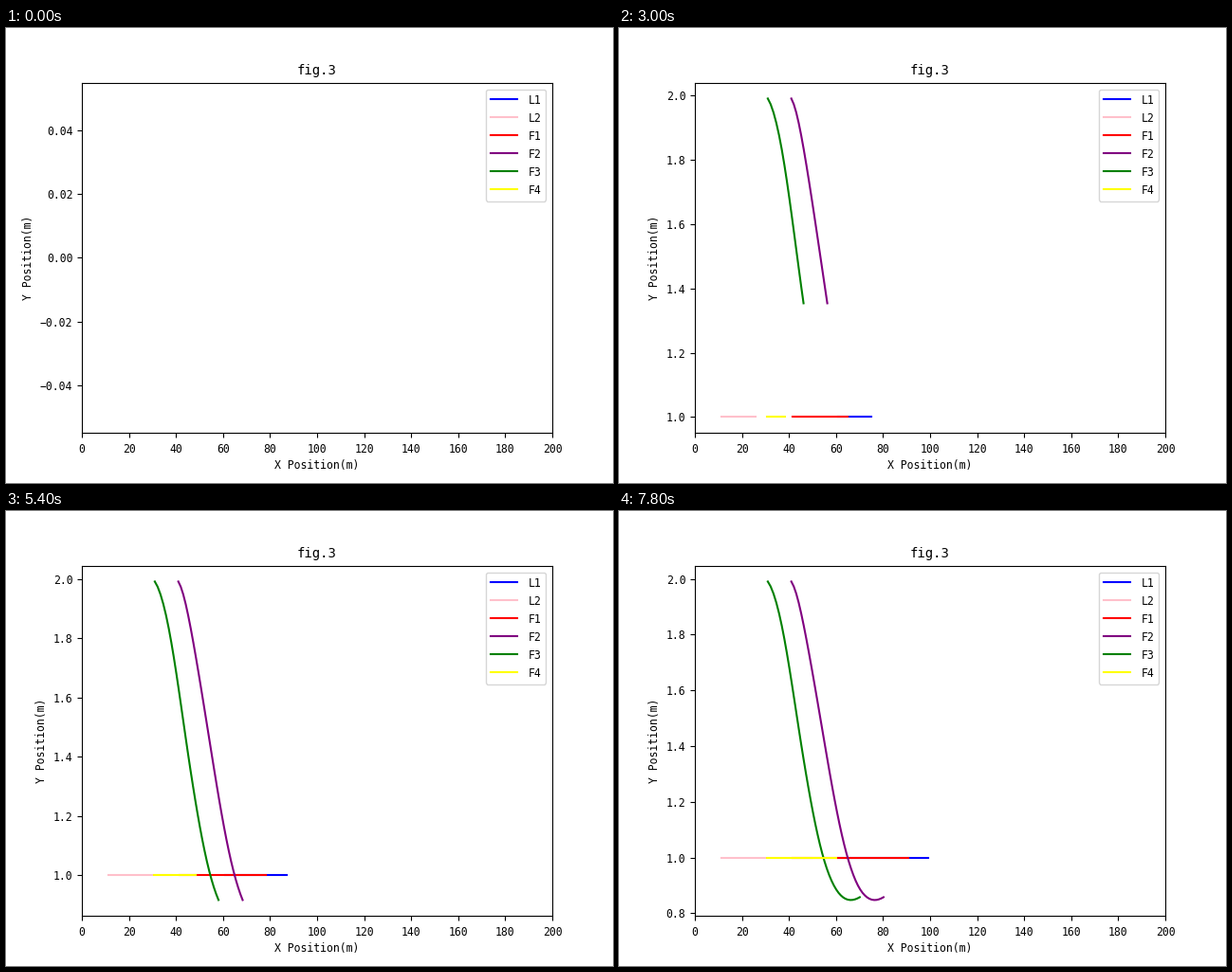
Animation, 640 px wide and 480 px high, one loop 8000 ms. Source, as a matplotlib script:

```python
import matplotlib.pyplot as plt
import numpy as np
from matplotlib.animation import FuncAnimation

FRAMES, INTERVAL = 40, 200
TEXT, TITLE = 8.3, 10
K = 10 / TEXT  # keeps legend spacing independent of the text size

plt.rcParams["font.family"] = "DejaVu Sans Mono"
plt.rcParams["font.size"] = TEXT

step = np.arange(1, FRAMES)
KEYS = np.array([1, 5, 15, 25, 29, 33, 39])


def smooth(values):
    """Cubic Hermite curve through the key steps."""
    v = np.array(values, float)
    slope = np.gradient(v, KEYS)
    j = np.clip(np.searchsorted(KEYS, step, side="right") - 1, 0, len(KEYS) - 2)
    h = KEYS[j + 1] - KEYS[j]
    u = (step - KEYS[j]) / h
    return ((1 + 2 * u) * (1 - u) ** 2 * v[j] + u * (1 - u) ** 2 * h * slope[j]
            + u * u * (3 - 2 * u) * v[j + 1] + u * u * (u - 1) * h * slope[j + 1])


def damped(t, decay=0.0529, freq=0.0884):
    """Underdamped settling from 2 towards 1, starting at rest."""
    swing = np.cos(freq * t) + decay / freq * np.sin(freq * t)
    return 1 + np.exp(-decay * t) * swing


flat = np.ones(len(step))
merge = damped(step + 0.35)

# name, colour, x position relative to unit speed, y position
tracks = [
    ("L1", "blue", 60 * flat, flat),
    ("L2", "pink", 10 + 0.75 * (1 - np.exp(-step / 2)), flat),
    ("F1", "red", smooth([40.5, 43, 49.9, 51.2, 51.5, 51.6, 51.7]), flat),
    ("F2", "purple", smooth([40, 40.2, 41.3, 41.4, 41.3, 41.3, 41.2]), merge),
    ("F3", "green", smooth([30, 30.8, 31.2, 31.1, 31.1, 31.1, 31.1]), merge),
    ("F4", "yellow", smooth([29.6, 27.7, 23.3, 21.7, 21.4, 21.2, 21.1]), flat),
]

fig, ax = plt.subplots(figsize=(6.4, 4.8), dpi=100)
lines = [ax.plot([], [], color=color, lw=1.5, label=name)[0]
         for name, color, _, _ in tracks]

ax.set_xlim(0, 200)
ax.set_xticks(range(0, 201, 20))
ax.tick_params(axis="x", pad=4.6)
ax.set_title("fig.3", fontsize=TITLE)
ax.set_xlabel("X Position(m)", labelpad=2.5)
ax.set_ylabel("Y Position(m)", labelpad=4)
ax.legend(loc="upper right", borderpad=0.36 * K, labelspacing=0.432 * K,
          handlelength=2 * K, handleheight=0.98 * K, handletextpad=0.84 * K,
          borderaxespad=0.5 * K)


def update(i):
    for line, (_, _, offset, y) in zip(lines, tracks):
        line.set_data((step + offset)[:i], y[:i])
    if i == 0:
        ax.set_ylim(-0.055, 0.055)
    else:
        low, high = min(1, merge[:i].min()), merge[0]
        margin = 0.05 * (high - low)
        ax.set_ylim(low - margin, high + margin)
    return lines


anim = FuncAnimation(fig, update, frames=FRAMES, interval=INTERVAL,
                     repeat=True, repeat_delay=0, blit=False)
plt.show()
```
